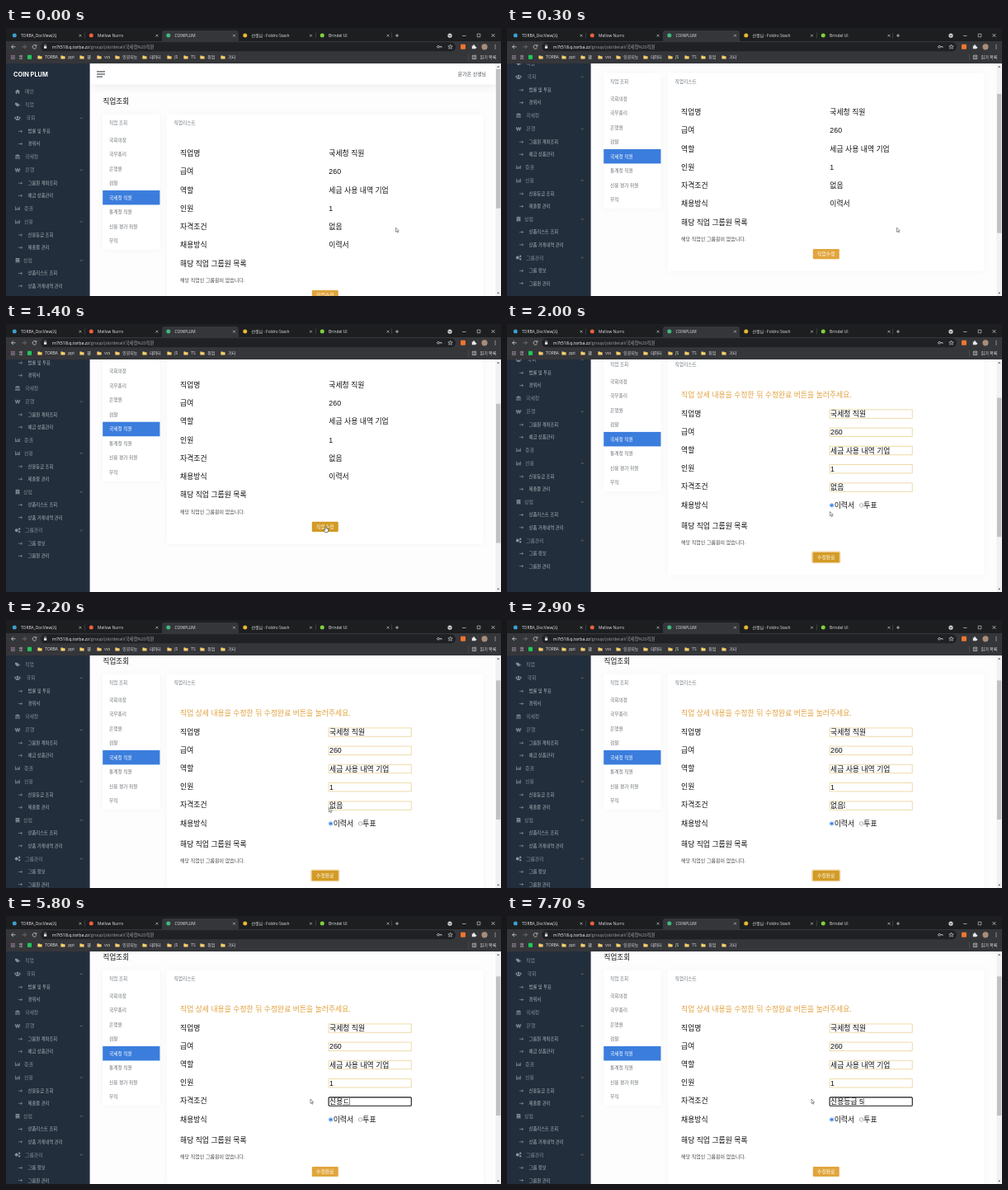
Recreate the animation shown at these times as an HTML page with a canvas. Size 600x325 px, loop 8000 ms.

```html
<!DOCTYPE html>
<html lang="ko">
<head>
<meta charset="utf-8">
<title>COINPLUM</title>
<style>
html, body { margin: 0; width: 100%; height: 100%; overflow: hidden; background: #fff; }
canvas { display: block; width: 600px; height: 325px; }
</style>
</head>
<body>
<canvas id="stage"></canvas>
<script>
const W = 600, H = 325, LOOP = 8000, STEP = 100, TOP = 43, SIDE = 101.6;
const PAGE = '"Liberation Sans", "Noto Sans CJK KR", "Noto Sans CJK", sans-serif';
const UI = '"Open Sans", "Noto Sans CJK KR", "Noto Sans CJK", sans-serif';
const BRAND = 'Inter, "Liberation Sans", sans-serif';
const FORM_AT = 1600, FOCUS_AT = 3000;

const canvas = document.getElementById('stage');
const g = canvas.getContext('2d');
const dpr = window.devicePixelRatio || 1;
canvas.width = W * dpr;
canvas.height = H * dpr;

// ---- drawing helpers ----
function rect(x, y, w, h, color) {
  g.fillStyle = color;
  g.fillRect(x, y, w, h);
}

function round(x, y, w, h, r, color) {
  g.fillStyle = color;
  g.beginPath();
  g.roundRect(x, y, w, h, r);
  g.fill();
}

function dot(x, y, r, color) {
  g.fillStyle = color;
  g.beginPath();
  g.arc(x, y, r, 0, 7);
  g.fill();
}

function path(d, x, y, fill, stroke, width = 0.7) {
  const p = new Path2D(d);
  g.save();
  g.translate(x, y);
  if (fill) { g.fillStyle = fill; g.fill(p); }
  if (stroke) { g.strokeStyle = stroke; g.lineWidth = width; g.stroke(p); }
  g.restore();
}

// y is the vertical centre of the glyphs
function text(s, x, y, size, color, family = PAGE, align = 'left', weight = 400) {
  g.font = `${weight} ${size}px ${family}`;
  g.textAlign = align;
  g.fillStyle = color;
  g.fillText(s, x, y + size * 0.36);
}

function card(x, y, w, h) {
  g.save();
  g.shadowColor = 'rgba(33,37,41,.04)';
  g.shadowBlur = 9 * dpr;
  round(x, y, w, h, 1.5, '#fff');
  g.restore();
}

// ---- motion ----
function along(keys, t) {
  if (t <= keys[0][0]) return keys[0].slice(1);
  for (let i = 1; i < keys.length; i++) {
    const a = keys[i - 1], b = keys[i];
    if (t <= b[0]) {
      const k = (t - a[0]) / (b[0] - a[0]);
      return a.slice(1).map((v, j) => v + (b[j + 1] - v) * k);
    }
  }
  return keys[keys.length - 1].slice(1);
}

const SCROLL = [[100, 0], [200, 18], [300, 50], [400, 73.5], [500, 78.2],
  [1900, 78.2], [2000, 66], [2100, 46], [2200, 39]];

const POINTER = [[600, 472.5, 242], [1200, 387.5, 245.5], [1700, 387.5, 245.5],
  [2000, 391.5, 227.5], [2300, 391.5, 227.5], [2600, 409, 225],
  [3100, 409, 224], [3500, 369, 222]];

// time, text, whether the last syllable is still being composed
const TYPING = [
  [4000, 'ㅅ', 1], [4100, '시', 1], [4400, '신', 1], [4500, '신ㅇ', 1],
  [4700, '신요', 1], [4900, '신용', 1], [5800, '신용ㄷ', 1], [5900, '신용드', 1],
  [6000, '신용등', 1], [6100, '신용등ㄱ', 1], [6200, '신용등그', 1],
  [6400, '신용등급', 1], [6900, '신용등급 ', 0], [7700, '신용등급 5', 0]
];

// ---- browser frame ----
const TABS = [
  [0, 'TORBA_DocView(자', '#3a9fd0'], [93, 'Mellow Nurro', '#e8603c'],
  [186.5, 'COINPLUM', '#41b883'], [279.5, '선생님 - Foldro Stash', '#e9b92f'],
  [373, 'Brindel UI', '#7fd13b']
];
const FOLDERS = [[41, 'TORBA'], [69, 'ppt'], [92, '웹'], [113, 'vcs'], [135, '인공지능'],
  [168, '데이터'], [198, 'JS'], [218, 'TS'], [238, '취업'], [263, '기타']];

function cross(x, y, r, color) {
  path(`M${-r} ${-r}L${r} ${r}M${r} ${-r}L${-r} ${r}`, x, y, null, color, 0.7);
}

function drawTabs(pale) {
  rect(0, 0, W, 16, '#1d1e20');
  round(189, 3, 93, 14, [3, 3, 0, 0], '#35363a');
  for (const [x, label, color] of TABS) {
    dot(x + 10.3, 9, 2.5, color);
    text(label, x + 18, 9.2, 4.9, pale, UI);
    cross(x + 90, 9.2, 1.4, '#c4c7cb');
  }
  [95, 375.5, 467].forEach(x => rect(x, 5.5, 0.5, 7, '#55585c'));
  path('M-2 0H2M0 -2V2', 474, 9.2, null, pale);
  dot(538, 9.2, 2.6, '#c9ccd0');
  path('M-1.2 -.5L0 .7L1.2 -.5', 538, 9.2, null, '#1d1e20', 0.7);
  rect(553, 9, 4.5, 0.6, pale);
  path('M-1.8 -1.8H1.8V1.8H-1.8Z', 573, 9, null, pale, 0.6);
  cross(590.5, 9, 1.9, pale);
}

function drawToolbar(pale) {
  const y = 22.8, host = 'm7t518.q.torba.zz';
  path('M2.5 0H-2.5M0 -2.3L-2.4 0L0 2.3', 9, y, null, pale);
  path('M-2.5 0H2.5M0 -2.3L2.4 0L0 2.3', 22, y, null, '#7b7e83');
  path('M1.8 -1.3A2.3 2.3 0 1 0 2.2 .7M2.3 -2.5V-.8H.5', 34.5, y, null, pale);
  round(42, y - 5.5, 503, 11, 5.5, '#202124');
  rect(46, y - 0.7, 3.2, 2.7, pale);
  path('M-1 0V-1A1 1 0 0 1 1 -1V0', 47.6, y - 0.6, null, pale, 0.6);
  text(host, 56, y, 5.3, '#fff', UI);
  text('/group/job/detail/국세청%20직원', 56 + g.measureText(host).width, y, 5.3, '#9aa0a6', UI);
  path('M.3 0A1.3 1.3 0 1 1 .3 -.1H3V1', 525, y, null, pale, 0.8);
  path('M0 -2.7L.8 -.8L2.7 -.8L1.2 .5L1.7 2.4L0 1.3L-1.7 2.4L-1.2 .5L-2.7 -.8L-.8 -.8Z', 538.5, y, null, pale, 0.6);
  round(551, y - 3, 6, 6, 1, '#f0752f');
  path('M-2.2 -1.3H-.8A.9 .9 0 1 1 .9 -1.3H2V.1A.9 .9 0 1 1 2 1.7V2.5H-2.2Z', 567, y, pale);
  dot(580, y, 3.6, '#a98d78');
  [-2, 0, 2].forEach(d => dot(593, y + d, 0.6, pale));
}

function drawBookmarks(pale) {
  const y = 35.4;
  for (let i = 0; i < 9; i++)
    rect(6 + (i % 3) * 1.8, y - 2.3 + Math.floor(i / 3) * 1.8, 1.2, 1.2, i % 2 ? '#6aa5f0' : '#e57f6f');
  text('앱', 15.5, y, 4.9, pale, UI);
  rect(26, y - 2.6, 5, 5, '#1fc75a');
  for (const [x, label] of FOLDERS) {
    path('M-2.6 -2H-.4L.3 -1.2H2.6V2.1H-2.6Z', x, y, '#f6d06c');
    text(label, x + 6.3, y, 4.9, pale, UI);
  }
  rect(560.5, y - 4, 0.5, 8, '#5c5f63');
  path('M-2.2 -2.2H2.2V2.2H-2.2ZM-1 -.8H1.2M-1 .8H1.2', 567.5, y, null, pale, 0.6);
  text('읽기 목록', 574.6, y, 5, pale, UI);
}

function drawBrowser() {
  const pale = '#e4e6e9';
  rect(0, 0, W, TOP, '#35363a');
  drawTabs(pale);
  drawToolbar(pale);
  drawBookmarks(pale);
}

// ---- sidebar ----
const ICONS = {
  home: 'M-3.2 .2L0 -2.8L3.2 .2H2.2V2.7H.6V.9H-.6V2.7H-2.2V.2Z',
  tag: 'M-3 -2.2H-.4L2.2 .4L0 2.6L-3 -.2ZM.6 -2.2L3.4 .4L1.2 2.6L2.8 .4Z',
  people: 'M-1.4 -1.2A1.4 1.4 0 1 1 1.4 -1.2A1.4 1.4 0 1 1 -1.4 -1.2ZM-2.2 2.4V1.4L-1 .5H1L2.2 1.4V2.4ZM-3.4 -1.6H-2V1H-3.4ZM2 -1.6H3.4V1H2Z',
  bank: 'M-3 -1.3L0 -2.8L3 -1.3V-.8H-3ZM-2.4 -.4H-1.5V1.5H-2.4ZM-.5 -.4H.5V1.5H-.5ZM1.5 -.4H2.4V1.5H1.5ZM-3 1.8H3V2.6H-3Z',
  won: 'M-3 -2.4H-2.1L-1.4 1L-.4 -2.4H.4L1.4 1L2.1 -2.4H3L1.9 2.4H.9L0 -.6L-.9 2.4H-1.9ZM-3.3 -.7H3.3V0H-3.3Z',
  chart: 'M-3 -2.4H-2.3V1.7H3V2.4H-3ZM-1.6 0H-.8V1.2H-1.6ZM-.3 -1.3H.5V1.2H-.3ZM1 -.5H1.7V1.2H1ZM2.1 -2H2.8V1.2H2.1Z',
  shop: 'M-2.3 -2.8H2.3V2.8H.6V1.4H-.6V2.8H-2.3ZM-1.3 -1.9V-1H-.5V-1.9ZM.5 -1.9V-1H1.3V-1.9ZM-1.3 -.4V.5H-.5V-.4ZM.5 -.4V.5H1.3V-.4Z',
  gears: 'M-3.2 0A2 2 0 1 1 .8 0A2 2 0 1 1 -3.2 0ZM1 -1.8A1.2 1.2 0 1 1 3.4 -1.8A1.2 1.2 0 1 1 1 -1.8ZM1 1.8A1.2 1.2 0 1 1 3.4 1.8A1.2 1.2 0 1 1 1 1.8Z'
};
// y, label, icon (none for a sub entry), text x, has chevron
const MENU = [
  [77, '메인', 'home', 23], [93, '직업', 'tag', 23], [109.3, '국회', 'people', 24.5, 1],
  [125.3, '범률 및 투표'], [140.5, '경위서'],
  [156, '국세청', 'bank', 23], [172.3, '은행', 'won', 23.5, 1],
  [188.2, '그룹원 계좌조회'], [203.3, '예금 상품관리'],
  [218.7, '증권', 'chart', 22], [234.8, '신용', 'chart', 22, 1],
  [251, '신용등급 조회'], [266.3, '제출물 관리'],
  [281.8, '상점', 'shop', 21, 1], [297.5, '상품리스트 조회'], [312.8, '상품 거래내역 관리'],
  [328.5, '그룹관리', 'gears', 23, 1], [344.4, '그룹 정보'], [359.6, '그룹원 관리']
];

function drawSidebar() {
  const dim = '#878f98', pale = '#b2b8be';
  rect(0, 0, SIDE, 520, '#222e3c');
  text('COIN PLUM', 9, 56, 7.4, '#fff', BRAND, 'left', 700);
  for (const [y, label, icon, x, open] of MENU) {
    if (icon) {
      path(ICONS[icon], 14, y, dim);
      text(label, x, y, 5.9, dim);
    } else {
      path('M0 0H4.6M3 -1.4L4.6 0L3 1.4', 15, y, null, pale, 0.5);
      text(label, 26.6, y, 5.3, pale);
    }
    if (open) path('M-1.5 -.8L0 .8L1.5 -.8', 91.3, y, null, dim, 0.6);
  }
}

// ---- page ----
const JOBS = ['국회의장', '국무총리', '은행원', '검찰', '국세청 직원', '통계청 직원', '신용 평가 위원', '무직'];
const LABELS = ['직업명', '급여', '역할', '인원', '자격조건', '채용방식'];
const VALUES = ['국세청 직원', '260', '세금 사용 내역 기업', '1', '없음', '이력서'];
const INK = '#111', BODY = 8.85;

function drawHeader() {
  g.save();
  g.shadowColor = 'rgba(33,37,41,.1)';
  g.shadowBlur = 12 * dpr;
  rect(SIDE, 20, 492, 48.5, '#fff');
  g.restore();
  [10, 10, 7].forEach((w, i) => rect(110, 52.3 + i * 3.1, w, 1.2, '#495057'));
  text('문가온 선생님', 582, 56, 5.9, '#495057', PAGE, 'right');
  text('직업조회', 117.5, 88.7, 8.6, INK);
}

function drawJobs() {
  card(117.2, 104.5, 69.3, 164.5);
  text('직업 조회', 125, 115, 5.6, '#6c757d');
  JOBS.forEach((job, i) => {
    const y = 135.5 + i * 17.5, on = i === 4;
    if (on) rect(117.2, y - 8.6, 69.3, 17.5, '#3b7ddd');
    text(job, 125, y, 5.7, on ? '#fff' : '#686d72');
  });
}

function drawButton(label, y, active, ring) {
  if (ring) round(369.3, y - 7.4, 35, 14.8, 2, 'rgba(224,163,60,.5)');
  round(370.8, y - 6, 32, 12.2, 1.2, active ? '#d39b25' : '#e1a53d');
  text(label, 386.8, y, 5.9, '#fff', PAGE, 'center');
}

function drawFoot(y) {
  text('해당 직업 그룹원 목록', 211, y, BODY, INK);
  text('해당 직업인 그룹원이 없습니다.', 211, y + 20.6, 6, '#444');
}

function drawDetails(t) {
  card(195, 104.5, 383.5, 240.5);
  text('직업리스트', 203.5, 115, 5.7, '#6c757d');
  LABELS.forEach((label, i) => {
    const y = 152 + i * 22.25;
    text(label, 211, y, BODY, INK);
    text(VALUES[i], 391.3, y, BODY, INK);
  });
  drawFoot(285.5);
  drawButton('직업수정', 324, t >= 1200, t >= 1500);
}

function drawField(y, value, focused) {
  g.lineWidth = focused ? 1.1 : 0.7;
  g.strokeStyle = focused ? '#181818' : '#e9cc85';
  g.fillStyle = '#fff';
  g.beginPath();
  g.roundRect(391.1, y - 5, 100.2, 10.4, focused ? 1 : 0);
  g.fill();
  g.stroke();
  text(value, 392, y + 0.2, BODY, INK);
}

function drawEntry(y, t) {
  const typed = TYPING.filter(k => k[0] <= t).pop();
  const value = typed ? typed[1] : '없음';
  drawField(y, value, t >= FOCUS_AT);
  const width = g.measureText(value).width, end = 392 + width;
  if (typed) {
    if (typed[2]) {
      const last = g.measureText(value.slice(-1)).width;
      rect(end - last, y + 3.8, last, 0.5, INK);
    }
    if (Math.floor((t - typed[0]) / 500) % 2 === 0) rect(end, y - 4, 0.5, 8, INK);
  } else if (t > 3100) {
    const from = Math.max(392, along(POINTER, t)[0]);
    g.save();
    g.beginPath();
    g.rect(from, y - 4.3, end - from, 9);
    g.clip();
    rect(392, y - 4.3, width, 9, '#3390ff');
    text(value, 392, y + 0.2, BODY, '#fff');
    g.restore();
  } else if (t >= FOCUS_AT) {
    rect(end, y - 4, 0.5, 8, INK);
  }
}

function drawRadio(x, y, on) {
  dot(x, y, 2.4, on ? '#1a73e8' : '#777');
  dot(x, y, 1.9, '#fff');
  if (on) dot(x, y, 1.4, '#1a73e8');
}

function drawForm(t) {
  card(195, 104.5, 383.5, 266);
  text('직업리스트', 203.5, 115, 5.7, '#6c757d');
  text('직업 상세 내용을 수정한 뒤 수정완료 버튼을 눌러주세요.', 211, 152, BODY, '#e1a03f');
  LABELS.forEach((label, i) => {
    const y = 174.5 + i * 22.2;
    text(label, 211, y, BODY, INK);
    if (i < 4) drawField(y + 0.4, VALUES[i], false);
    else if (i === 4) drawEntry(y + 0.6, t);
    else {
      drawRadio(393.6, y + 0.5, true);
      text('이력서', 396.7, y, BODY, INK);
      drawRadio(429.6, y + 0.5, false);
      text('투표', 432.3, y, BODY, INK);
    }
  });
  drawFoot(310.6);
  const held = t < FOCUS_AT;
  drawButton('수정완료', 348.9, held, held);
}

function drawScrollbar(scroll) {
  const full = 448, track = 268;
  rect(593.3, TOP, 7, H - TOP, '#f1f1f1');
  rect(594, 50 + scroll * track / full, 5.4, track * (H - TOP) / full, '#c1c1c1');
  path('M-1.5 .8L0 -.9L1.5 .8Z', 596.7, 47, '#505050');
  path('M-1.5 -.8L0 .9L1.5 -.8Z', 596.7, 321.5, '#505050');
}

function drawPointer(t) {
  const [x, y] = along(POINTER, t);
  if (t >= 1200 && t < FORM_AT)
    path('M-.7 0Q0 -.7 .7 0V2.4L3.2 3V5L2.4 7H-1L-2.8 4.2L-2 3.6L-.7 4.6Z', x, y, '#fff', '#222', 0.6);
  else if (t >= 2400 && t < 3400)
    path('M-1 -3H1M0 -3V3M-1 3H1', x, y, null, '#222', 0.6);
  else
    path('M0 0V5.4L1.3 4.2L2.1 6.2L2.9 5.9L2.1 4H3.8Z', x, y, '#fff', '#333', 0.5);
}

function draw(t) {
  const scroll = along(SCROLL, t)[0];
  g.setTransform(dpr, 0, 0, dpr, 0, 0);
  rect(0, 0, W, H, '#fdfdfe');
  g.save();
  g.translate(0, -scroll);
  drawHeader();
  drawJobs();
  if (t < FORM_AT) drawDetails(t);
  else drawForm(t);
  drawSidebar();
  g.restore();
  drawScrollbar(scroll);
  drawBrowser();
  drawPointer(t);
}

function tick() {
  draw(Math.floor(performance.now() % LOOP / STEP) * STEP);
  requestAnimationFrame(tick);
}
tick();
</script>
</body>
</html>
```
